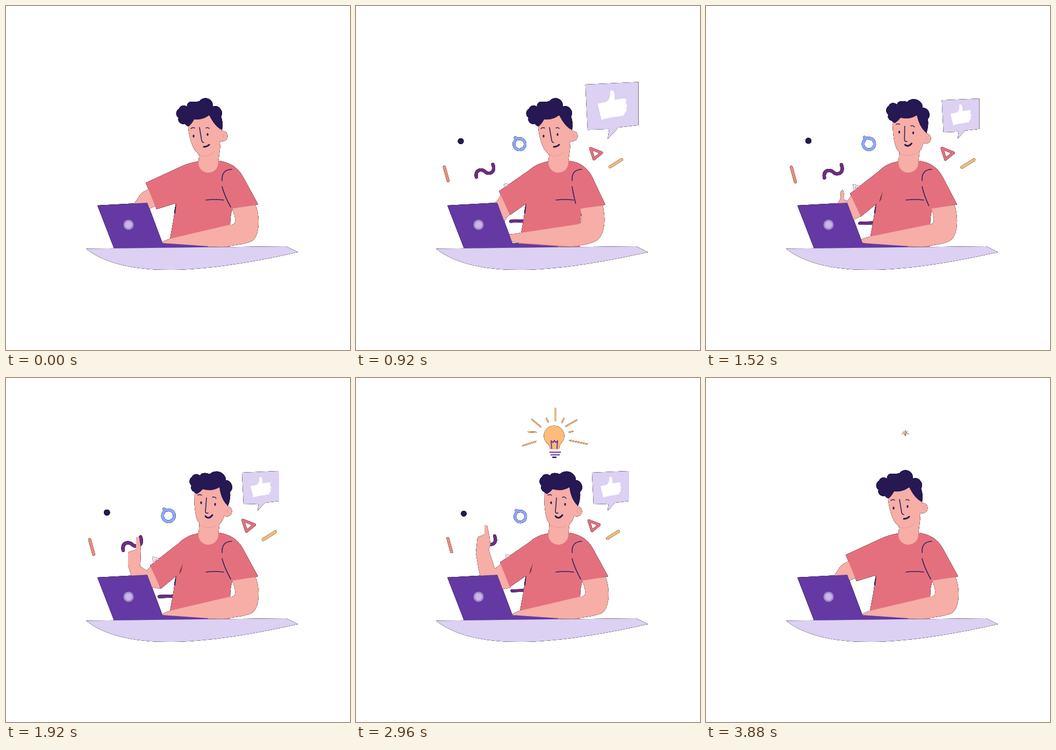
Animation of 640x640 px, one loop 3.92 s. Source, as an HTML page with a canvas:

```html
<!DOCTYPE html>
<html lang="en">
<head>
<meta charset="utf-8">
<title>Bright idea at the desk</title>
<style>
  html, body { margin: 0; width: 100%; height: 100%; overflow: hidden; background: #fff; }
  canvas { display: block; filter: drop-shadow(0 0 .5px #000) drop-shadow(0 0 .5px #000); }
</style>
</head>
<body>
<canvas id="stage" width="640" height="640"></canvas>
<script>
const ctx = document.getElementById('stage').getContext('2d');
const LOOP = 3920;
const SKIN = '#f6aea6', SHIRT = '#e4707e', HAIR = '#261853', INK = '#27245f',
      PURPLE = '#6439a3', PLUM = '#6b2f83', LILAC = '#dcd0f3', ORANGE = '#ffbb7a';

// Blends two numbers, or every number inside two paths of equal structure.
function mix(a, b, k) {
  if (typeof a === 'number') return a + (b - a) * k;
  const ends = b.match(/[\d.]+/g);
  let i = 0;
  return a.replace(/[\d.]+/g, n => +n + (ends[i++] - n) * k);
}

// Value of a [time, value] track, eased between neighbouring keys.
function at(track, t) {
  const i = track.findIndex(key => key[0] > t);
  if (i === 0) return track[0][1];
  if (i < 0) return track[track.length - 1][1];
  const [t0, a] = track[i - 1], [t1, b] = track[i];
  return mix(a, b, (1 - Math.cos(Math.PI * (t - t0) / (t1 - t0))) / 2);
}

function fill(d, color) {
  ctx.fillStyle = color;
  ctx.fill(new Path2D(d));
}

function line(d, color, width) {
  ctx.strokeStyle = color;
  ctx.lineWidth = width;
  ctx.stroke(new Path2D(d));
}

function disc(x, y, r, color) {
  ctx.fillStyle = color;
  ctx.beginPath();
  ctx.arc(x, y, r, 0, 7);
  ctx.fill();
}

function scaled(x, y, s, draw) {
  if (s < .005) return;
  ctx.save();
  ctx.translate(x, y);
  ctx.scale(s, s);
  ctx.translate(-x, -y);
  draw();
  ctx.restore();
}

const forearm = {
  rest: 'M279 370L267 376L262 382L250 380L243 374L240 367L245 360L248 355L250 352L253 349L256 347L260 345L264 343L268 338Z',
  type: 'M288 390L280 402L278 408L272 410L265 405L260 395L258 385L258 380L259 376L260 374L261 371L263 369L265 367L270 357Z',
  point: 'M286 391L270 388L250 378L234 368L228 348L228 325L243 320L243 297L247 297L250 321L249 345L248 350L262 360L271 350Z',
  raise: 'M287 389L268 393L236 385L229 355L224 325L227 297L240 292L240 275L243 275L247 293L249 309L246 320L258 357L272 345Z',
  lower: 'M284 383L270 385L250 380L232 372L230 366L231 350L245 347L245 328L248 328L252 351L255 353L258 352L264 348L268 343Z'
};
const sleeve = {
  rest: 'M358 289Q340 292 325 299L260 329L280 378L316 367L330 345L370 300Z',
  type: 'M358 289Q335 293 322 307L268 349L288 392L322 364L330 345L370 300Z',
  raise: 'M358 289Q335 293 322 306L268 343L286 389L322 364L330 345L370 300Z',
  lower: 'M358 289Q337 293 318 304L266 339L285 388L316 369L330 345L370 300Z'
};
const armTrack = pose => [[300, pose.rest], [1200, pose.type], [1920, pose.point || pose.type],
  [2240, pose.raise], [2960, pose.raise], [3360, pose.lower], [3680, pose.rest]];
const forearmTrack = armTrack(forearm), sleeveTrack = armTrack(sleeve);

const confettiTrack = [[80, 0], [520, 1.017], [1200, .84], [1760, .988], [2200, .85], [2840, .988], [3380, 0]];
const bubbleTrack = [[600, 0], [900, 1.44], [1130, .95], [1340, 1.14], [1560, 1], [3260, 1], [3420, 0]];
const bulbTrack = [[2120, 0], [2340, 1.49], [2670, .96], [2860, 1], [3440, 1], [4000, 0]];
const headTrack = [[1120, 0], [1720, 1], [3080, 1], [3560, 0]];
const typingTrack = [[80, 0], [1200, 1], [1720, 0]];
const foldTrack = [[960, 0], [1200, 1], [2960, 1], [3280, 0]];

function confetti() {
  line('M291 248A11.500 11.500 0 1 0 296 244.500L291 242', '#8fa8fb', 5.5);
  disc(179, 249, 6, HAIR);
  line('M145 302L153 331', '#ec8c7c', 5.5);
  line('M211 323C208 306 224 306 229 312S252 316 245 297', PLUM, 6.5);
  line('M446 264L469 273L453 286Z', SHIRT, 5);
  line('M486 302L510 287', '#f0bc78', 5.5);
  line('M282 414L312 413', PLUM, 6);
  line('M270 338L290 344L275 358Z', '#e9e3f6', 4);
}

function bubble() {
  fill('M439 176L508 173L508 229L482 232L468 247L470 234L442 235Z', LILAC);
  fill('M455 201L466 199L468 220L460 222Z', '#fff');
  fill('M466 199Q473 194 471 185Q476 181 477 190L477 196L490 194Q494 196 491 200Q495 203 492 207Q494 211 490 213Q490 217 486 217L467 220Z', '#fff');
}

function bulb() {
  line('M371 56V80M327 77L344 91M354 75L358 82M387 75L383 83M390 90L411 78M396 101L404 99M397 116L431 123M320 100L336 101M310 126L335 118', ORANGE, 2.2);
  fill('M361 133Q361 126 355 121A19 19 0 1 1 382 121Q378 126 378 133Z', ORANGE);
  line('M364 131L363 117L367 120L369 116L372 120L375 117L374 131', PURPLE, 2);
  line('M361 138H380M363 143H378M366 147.500H372', PURPLE, 2.2);
}

function body(t) {
  const typing = at(typingTrack, t), fold = at(foldTrack, t);
  const arm = at(forearmTrack, t);
  fill(arm, SKIN);
  line(arm, SKIN, 2);
  fill('M358 289Q328 310 316 367Q312 400 305 434L305 448H417V408Q417 390 421 378L420 300L398 288Z', SHIRT);
  fill(at(sleeveTrack, t), SHIRT);
  fill(mix('M395 288Q425 291 440 316L469 369L421 378L400 340Z',
           'M395 288Q430 291 444 328L463 370L417 378L400 340Z', typing), SHIRT);

  fill('M317 367L315 386L313 386Q314 374 317 367Z', INK);
  if (fold > .05) fill(mix('M329 345L329 345L329 345L329 345Z', 'M329 345L326 360L322 365L324 357Z', fold), '#7c3b4d');
  line('M402 325Q401 304 420 304M372 361Q388 359 405 361', INK, 1.6);
  if (typing < .9) line(mix('M402 336Q406 352 418 374', 'M402 336Q404 350 407 366', typing), INK, 1.6);

  fill('M360 268L358 293A18 18 0 0 0 395 290L399 258Z', SKIN);
  fill(mix('M421 377Q428 395 426 402Q424 408 416 407L305 433Q290 438 291 441L292 442L300 444L400 448Q445 444 458 437Q470 428 470 400Q469 380 464 370Z',
           'M417 377Q420 395 418 400Q418 405 411 406L302 421Q286 423 284 422L289 437L300 440L400 447Q442 444 452 431Q461 418 461 395Q460 380 458 371Z', typing), SKIN);
}

function head(t) {
  const turn = at(headTrack, t), both = (a, b) => mix(a, b, turn);
  const [ex, ey] = [both(403, 411), both(242, 248)];
  disc(ex, ey, 9.5, SKIN);
  line(`M${ex + 3} ${ey - 4}Q${ex - 2} ${ey - 2} ${ex + 2} ${ey + 3}`, '#ea9695', 1);
  fill(both('M338 215Q340 248 350 266Q360 281 374 280Q392 277 396 265L402 235L400 205L345 205Z',
            'M350 212Q350 250 356 265Q364 278 377 279Q398 277 404 262L412 240L408 205L358 205Z'), SKIN);
  line(both('M359 277Q373 284 388 271', 'M361 274Q376 282 391 275'), '#ea9695', 1);
  fill(both('M340 224Q334 222 333 219A9 9 0 0 1 321 208A10 10 0 0 1 322 191A9 9 0 0 1 337 188A8 8 0 0 1 345 178Q354 179 360 177A14 14 0 0 1 384 180L385 187A13 13 0 0 1 400 206Q404 214 402 231Q388 224 378 203Q366 213 350 211Q346 219 340 224Z',
            'M355 216Q351 214 350 212A9 9 0 0 1 345 200A10 10 0 0 1 346 184A9 9 0 0 1 361 182A8 8 0 0 1 364 178Q371 175 379 179A18 18 0 0 1 408 184L409 190A13 13 0 0 1 417 212Q418 225 413 238Q400 227 397 203Q384 212 366 207Q362 212 355 216Z'), HAIR);
  line(both('M344 228Q347 225 351 227M372 227Q376 225 378 228',
            'M357 218Q360 216 364 218M384 222Q388 220 391 224'), INK, 1.4);
  line(both('M360 226L364 250Q365 254 368 254', 'M373 223L371 249Q372 253 376 251'), INK, 1.6);
  line(both('M368 262Q374 262 378 258', 'M371 257Q377 264 384 255'), HAIR, 3);

  const eyes = [[both(349, 363), both(242, 232)], [both(375, 389), both(239, 235)]];
  const shut = t > 2480 && t < 2640;
  for (const [x, y] of eyes) {
    if (shut) line(`M${x - 2} ${y}H${x + 2}`, '#a86f7c', 1);
    else line(`M${x} ${y - 1}V${y + 1}`, HAIR, 3);
  }
}

function desk() {
  fill('M170 371L263 366L291 441L376 447V449L201 451Z', PURPLE);
  disc(228, 407, 9.5, '#a78cd2');
  disc(228, 407, 6.5, '#c9b8e6');
  fill('M149 451.500L521 447L543 458Q400 490 310 491Q200 492 149 451.500Z', LILAC);
}

function draw() {
  const t = performance.now() % LOOP;
  ctx.clearRect(0, 0, 640, 640);
  ctx.lineCap = ctx.lineJoin = 'round';
  scaled(345, 274, at(confettiTrack, t), confetti);
  scaled(467.5, 246, at(bubbleTrack, t), bubble);
  // The bulb grows from its base and shrinks to its centre.
  scaled(371, t < 3000 ? 149 : 102, at(bulbTrack, t), bulb);
  body(t);
  head(t);
  desk();
  requestAnimationFrame(draw);
}
draw();
</script>
</body>
</html>
```
